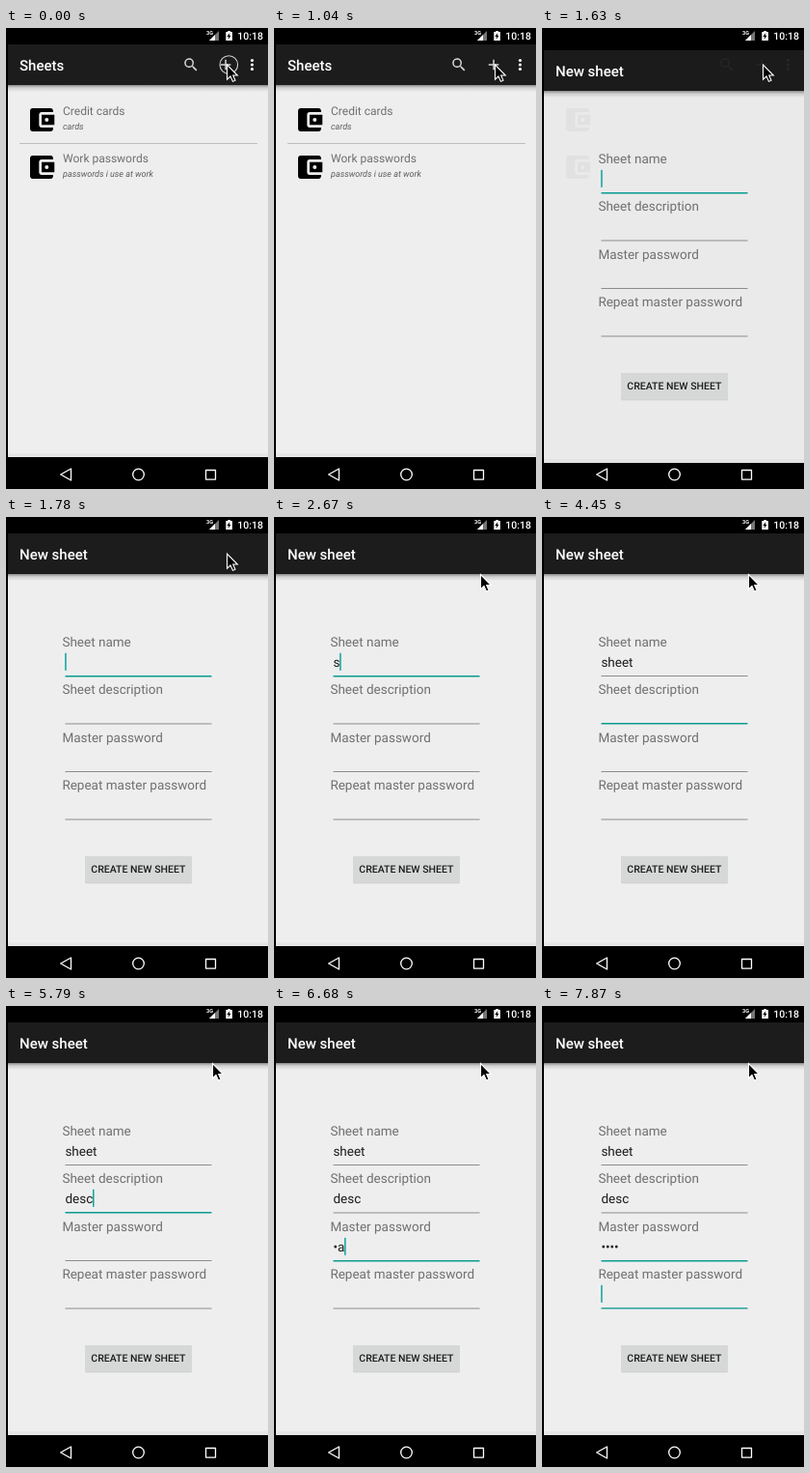
Recreate the animation shown at these times as an HTML page. Size 272 px wide and 477 px high, loop 8 s.

```html
<!DOCTYPE html>
<html lang="en">
<head>
<meta charset="utf-8">
<title>New sheet</title>
<style>
  html, body { margin: 0; width: 100%; height: 100%; overflow: hidden; background: #000; }
  svg { display: block; width: 100vw; height: 100vh; font-family: Roboto, sans-serif; text-rendering: geometricPrecision; }
  .title { font-size: 15px; font-weight: 500; fill: #fff; }
  .item { font-size: 12px; fill: #6f6f6f; }
  .note { font-size: 9px; font-style: italic; fill: #5c5c5c; }
  .label { font-size: 13.5px; fill: #707070; }
  .value { font-size: 13.5px; fill: #1c1c1c; }
  .button { font-size: 10.5px; font-weight: 500; fill: #1c1c1c; }
</style>
</head>
<body>
<svg viewBox="0 0 272 477">
  <defs>
    <linearGradient id="shade" x2="0" y2="1">
      <stop offset="0" stop-color="#000" stop-opacity=".42"/>
      <stop offset=".4" stop-color="#000" stop-opacity=".13"/>
      <stop offset="1" stop-color="#000" stop-opacity="0"/>
    </linearGradient>
    <clipPath id="barClip"><rect x="2" y="17" width="270" height="42"/></clipPath>
    <g id="window">
      <rect x="2" y="17" width="270" height="427" fill="#eee"/>
      <rect x="2" y="440" width="270" height="4" fill="#e6e6e6"/>
      <rect x="2" y="59" width="270" height="7" fill="url(#shade)"/>
      <rect x="2" y="17" width="270" height="42" fill="#1c1c1c"/>
    </g>
    <path id="wallet" d="M21 18v1c0 1.1-.9 2-2 2H5c-1.1 0-2-.9-2-2V5c0-1.1.9-2 2-2h14c1.1 0 2 .9 2 2v1h-9c-1.1 0-2 .9-2 2v8c0 1.1.9 2 2 2zM12 16h10V8H12zm4-2.5a1.5 1.5 0 1 1 0-3 1.5 1.5 0 0 1 0 3z"/>
  </defs>

  <rect width="272" height="477"/>

  <!-- status bar -->
  <g fill="#fff">
    <text x="208" y="7" font-size="5.5" font-weight="700">3G</text>
    <path d="M211 13L221 3V13Z" fill="#777"/>
    <path d="M211 13L217 7V13Z"/>
    <path d="M228.3 4h2V3h2.6v1h2v9h-6.6z"/>
    <path d="M232.3 5l-3 4h1.8l-.6 3 3.1-4.2h-1.8z" fill="#000"/>
    <text x="240.3" y="12.2" font-size="10.5" font-weight="500">10:18</text>
  </g>

  <!-- navigation bar -->
  <g fill="none" stroke="#fff" stroke-width="1.3" stroke-linejoin="round">
    <path d="M56.7 462L67.5 456V468Z"/>
    <circle cx="137.5" cy="462" r="5.8"/>
    <rect x="207.5" y="457.5" width="10" height="9.6"/>
  </g>

  <g id="list">
    <use href="#window" id="listWindow"/>
    <circle id="ripple" cx="228" cy="38" fill="#fff" clip-path="url(#barClip)"/>
    <g fill="#d6d6d6">
      <path transform="translate(183 29) scale(.75)" d="M15.5 14h-.8l-.3-.3a6.5 6.5 0 1 0-.7.7l.3.3v.8l5 5 1.5-1.5zm-6 0a4.5 4.5 0 1 1 0-9 4.5 4.5 0 0 1 0 9z"/>
      <path d="M222.8 37.2h4.5v-4.5h1.5v4.5h4.5v1.5h-4.5v4.5h-1.5v-4.5h-4.5z"/>
    </g>
    <g fill="#fff">
      <circle cx="255.5" cy="33.5" r="1.6"/>
      <circle cx="255.5" cy="38" r="1.6"/>
      <circle cx="255.5" cy="42.5" r="1.6"/>
    </g>
    <use href="#wallet" transform="translate(21 79) scale(1.33)"/>
    <use href="#wallet" transform="translate(21 128) scale(1.33)"/>
    <g id="listText">
      <text class="title" x="14" y="43.5">Sheets</text>
      <text class="item" x="59" y="90">Credit cards</text>
      <text class="note" x="59" y="105">cards</text>
      <rect x="14" y="119" width="247" height="1" fill="#bdbdbd"/>
      <text class="item" x="59" y="139">Work passwords</text>
      <text class="note" x="59" y="154">passwords i use at work</text>
    </g>
  </g>

  <g id="form">
    <use href="#window" id="formWindow"/>
    <text class="title" x="14" y="43.5">New sheet</text>
    <g id="fields"></g>
    <rect x="82" y="351" width="111" height="28.2" rx="1.5" fill="#c4c4c4"/>
    <rect x="82" y="351" width="111" height="27.7" rx="1.5" fill="#d6d7d7"/>
    <text class="button" x="88.3" y="368.3">CREATE NEW SHEET</text>
    <rect id="caret" width="1.5" height="18" fill="#0aa599"/>
  </g>

  <circle id="press" cx="231.3" cy="38" r="9.3" fill="none" stroke="#d0d0d0" stroke-width="1.1"/>
  <path id="pointer" d="M0 0V15.2L3.5 12 6 17.4 8.5 16.3 6.2 11H10.8Z" fill="#000" stroke="#fff" stroke-width="1.1"/>
</svg>

<script>
const LOOP = 8000, ROW = 49.5, TEXT_X = 61.4;
const $ = id => document.getElementById(id);
const set = (el, attrs) => { for (const k in attrs) el.setAttribute(k, attrs[k]); };
const add = (parent, tag, attrs, text = '') => {
  const el = document.createElementNS('http://www.w3.org/2000/svg', tag);
  set(el, attrs);
  el.textContent = text;
  return parent.appendChild(el);
};
const visible = on => ({ visibility: on ? 'visible' : 'hidden' });

const fields = [
  { label: 'Sheet name', text: 'sheet', keys: [2670, 2970, 3120, 3410, 3560], focus: 1630 },
  { label: 'Sheet description', text: 'desc', keys: [5200, 5350, 5640, 5790], focus: 3860 },
  { label: 'Master password', text: 'pass', keys: [6390, 6680, 6830, 7130], focus: 6240, secret: true },
  { label: 'Repeat master password', text: '', keys: [], focus: 7720 },
];
fields.forEach((f, i) => {
  const parent = $('fields'), y = Math.floor(i * ROW);
  f.y = y;
  f.blur = fields[i + 1]?.focus ?? Infinity;
  add(parent, 'text', { class: 'label', x: 58.4, y: 134 + y }, f.label);
  f.rule = add(parent, 'rect', { x: 61.5, y: 164.1 + i * ROW, width: 152, height: .75, fill: '#6c6c6c' });
  f.line = add(parent, 'rect', { x: 61.5, y: 164 + y, width: 152, height: 1.5, fill: '#0a9c90' });
  f.value = add(parent, 'text', { class: 'value', x: TEXT_X, y: 155 + y });
});

// Caret blink: hidden spans
const blinks = [[2230, 2670], [4450, 4900], [7570, 7720]];

// Value of the latest [time, value] entry at or before t
const at = (t, keys) => keys.reduce((v, [time, value]) => t >= time ? value : v, keys[0][1]);

function shownText(f, t) {
  const n = f.keys.filter(k => t >= k).length;
  if (!f.secret) return f.text.slice(0, n);
  const hidden = t >= f.blur ? n : Math.max(0, n - 1);
  return '•'.repeat(hidden) + f.text.slice(hidden, n);
}

function lineStrength(f, t) {
  const fadeIn = f === fields[0] ? 1 : at(t - f.focus, [[-LOOP, 0], [140, .85], [280, 1]]);
  const fadeOut = at(t - f.blur, [[-Infinity, 1], [280, .5], [430, 0]]);
  return fadeIn * fadeOut;
}

function draw(t) {
  set($('press'), visible(t < 150));
  const [r, alpha] = at(t, [[0, [0, 0]], [440, [10, .1]], [590, [18, .16]], [740, [25, .14]], [890, [25, .06]], [1040, [0, 0]]]);
  set($('ripple'), { r, 'fill-opacity': alpha });

  const [px, py] = at(t, [[0, [229.5, 38]], [1930, [226, 43]], [2080, [218, 54]], [2230, [214.5, 59.5]]]);
  set($('pointer'), { transform: `translate(${px} ${py})` });

  const open = t >= 1630, settled = t >= 1780;
  const slide = `translate(0 ${open && !settled ? 6 : 0})`;
  set($('listWindow'), { transform: slide, opacity: open ? .75 : 1 });
  set($('listText'), visible(!open));
  set($('form'), { ...visible(open), transform: slide });
  set($('formWindow'), { opacity: settled ? 1 : .95 });
  if (!open) return;

  for (const f of fields) {
    const strength = lineStrength(f, t);
    f.value.textContent = shownText(f, t);
    set(f.line, { opacity: strength });
    set(f.rule, { opacity: 1 - strength });
    if (t >= f.focus && t < f.blur) {
      const width = f.value.textContent ? f.value.getComputedTextLength() : 0;
      set($('caret'), { x: 61.2 + width, y: 140.8 + f.y });
    }
  }
  set($('caret'), { opacity: blinks.some(([a, b]) => t >= a && t < b) ? 0 : 1 });
}

const start = performance.now();
function tick() {
  draw((performance.now() - start) % LOOP);
  requestAnimationFrame(tick);
}
tick();
</script>
</body>
</html>
```
